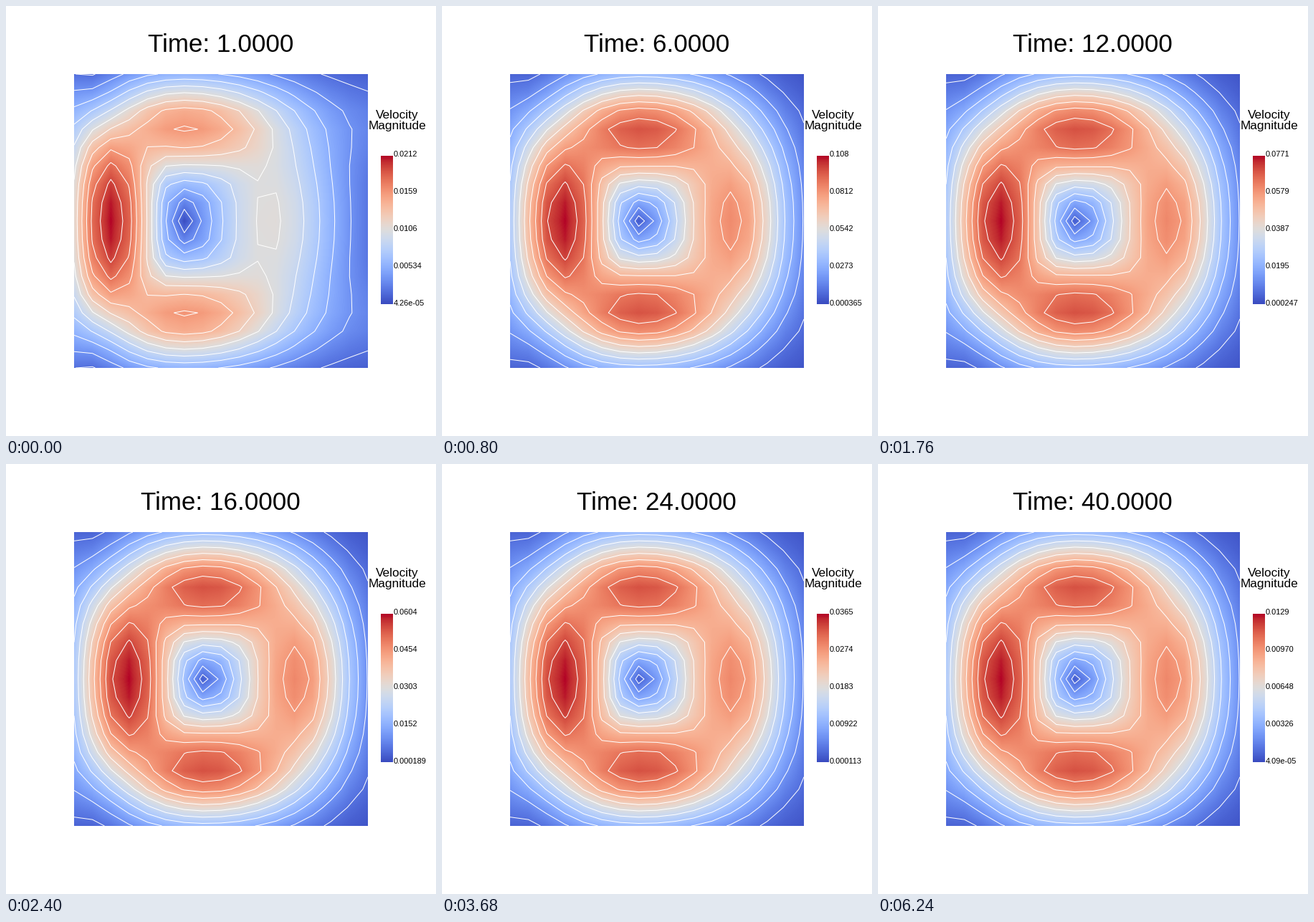
A matplotlib script that plays this animation: 600 px wide and 600 px high, repeating every 6400 ms.

```python
import numpy as np
import matplotlib.pyplot as plt
from matplotlib.animation import FuncAnimation

DPI = 100
FRAMES = 40
X0, X1 = 95, 505          # the square domain, in pixels
N = 17                    # grid nodes per side
FONT = "Liberation Sans"
LEVELS = np.arange(1, 12) / 12

# Jets around the vortex: height, centre, width towards each side (in cells),
# at the start and when settled.
LEFT = np.array([[1, 2, 2.5, 2.8], [1, 2.9, 2.83, 3.15]])
RIGHT = np.array([[.515, 10.6, 3.9, 4.2], [.79, 12.2, 4, 3]])
TOP = np.array([[.76, 2.8, 2.75, 3.3], [.9, 3.1, 2.95, 3.6]])

cells = np.arange(N)
nodes = np.linspace(X0, X1, N)
pixels = (np.arange(X1 - X0) + .5) / (X1 - X0) * (N - 1)
hat = np.maximum(0, 1 - np.abs(pixels[:, None] - cells))


def jet(states, phase):
    """Bell curve with its own width on each side of the centre."""
    height, centre, before, after = states[0] + (states[1] - states[0]) * phase
    d = cells - centre
    return height * np.exp(-(d / np.where(d < 0, before, after)) ** 2)


def stream(speed):
    """Normalised integral of a speed profile."""
    total = np.concatenate([[0], np.cumsum((speed[1:] + speed[:-1]) / 2)])
    total = np.maximum(total / total.max(), 0)
    return .035 + .965 * total


def speed_field(t):
    phase = 1 - .5 ** (t - 1)
    across = jet(LEFT, phase) - jet(RIGHT, phase)
    top = jet(TOP, phase)
    down = top - top[::-1]
    # the jet is fuller along the left wall
    fullness = 1 - .45 * np.exp(-14 * cells / (N - 1))
    u = np.outer(down, stream(across))
    v = across * stream(down)[:, None] ** fullness
    s = np.hypot(u, v)
    # the flow slows a little where it turns
    s *= 1 - .05 * (2 * u * v / (s * s + 1e-9)) ** 2
    return np.clip(s / s.max(), .003, 1)


def high_speed(t):
    """Quick start-up, then a decay that slowly becomes steady."""
    return np.exp(-1.67873 - .0665 * t - .208 * np.exp(-t / 13.5)
                  - 5.15896 * np.exp(-.99158 * t))


def low_speed(t):
    share = (.00298 + 4.6e-6 * t + .002 * np.exp(-t / 5)
             - .004244 * np.exp(-.4841 * t))
    return share * high_speed(t)


fig = plt.figure(figsize=(6, 6), dpi=DPI, facecolor="white")
ax = fig.add_axes([0, 0, 1, 1])
ax.axis("off")


def picture(data, extent):
    return ax.imshow(data, cmap="coolwarm", vmin=0, vmax=1, extent=extent,
                     aspect="auto", interpolation="nearest")


image = picture(np.zeros((X1 - X0, X1 - X0)), (X0, X1, X1, X0))
picture(np.linspace(1, 0, 207)[:, None], (523, 540, 416, 209))
ax.set_xlim(0, 600)
ax.set_ylim(600, 0)
ax.autoscale(False)


def label(x, y, text, px, ha="center"):
    return ax.text(x, y, text, fontname=FONT, fontsize=px * 72 / DPI, ha=ha,
                   va="baseline", color="black")


title = label(299.5, 64, "", 35)
label(546, 157, "Velocity", 17.2)
label(546, 172, "Magnitude", 17.2)
ticks = [label(541, 210.5 + 52 * k, "", 11, "left") for k in range(5)]
lines = []


def draw(frame):
    t = frame + 1
    s = speed_field(t)
    image.set_data(hat @ s @ hat.T)
    while lines:
        lines.pop().remove()
    lines.append(ax.contour(nodes, nodes, s, levels=LEVELS, colors="white",
                            linewidths=.72))
    title.set_text(f"Time: {t:.4f}")
    high, low = high_speed(t), low_speed(t)
    for k, tick in enumerate(ticks):
        tick.set_text(f"{high + (low - high) * k / 4:#.3g}")
    return [image, title, *ticks]


anim = FuncAnimation(fig, draw, frames=FRAMES, init_func=lambda: draw(0),
                     interval=160, repeat=True, repeat_delay=0, blit=False)
plt.show()
```
